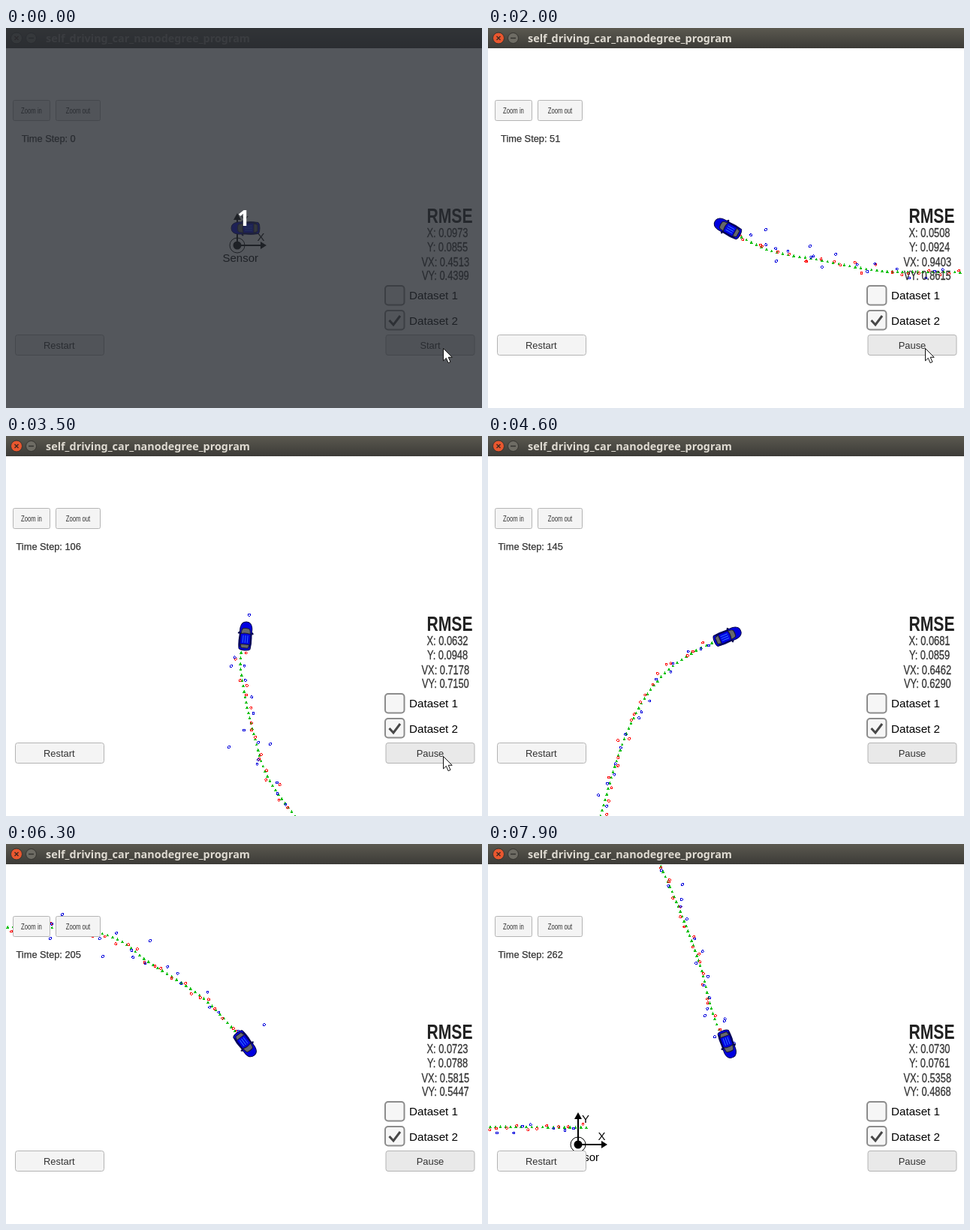
Animation of 634x507 px, one loop 8 s. Source, as an HTML page:

```html
<!DOCTYPE html>
<html lang="en">
<head>
<meta charset="utf-8">
<title>Tracking simulator</title>
<style>
html, body { margin: 0; width: 100%; height: 100%; overflow: hidden; background: #fff; }
svg { display: block; width: 634px; height: 507px; font-family: "Liberation Sans", Arial, sans-serif; }
.title { font: bold 14.4px "Noto Sans", "Open Sans", sans-serif; }
.btn { fill: #f4f4f4; stroke: #b4b4b4; }
.mid { text-anchor: middle; fill: #323232; }
.box { fill: #f6f6f6; stroke: #8c8c8c; stroke-width: 2; }
.dot { fill: none; stroke-width: 1; shape-rendering: crispEdges; }
</style>
</head>
<body>
<svg viewBox="0 0 634 507">
  <defs>
    <linearGradient id="bar" x2="0" y2="1">
      <stop offset="0" stop-color="#5b5950"/><stop offset="1" stop-color="#3c3b37"/>
    </linearGradient>
  </defs>
  <rect width="634" height="507" fill="#fff"/>

  <g id="world">
    <g font-size="15">
      <path d="M0 0H34M0 0V-36" stroke="#000" stroke-width="2"/>
      <path d="M39 0l-8 -5v10zM0 -43l-5 9h10z"/>
      <circle r="10" fill="none" stroke="#000"/>
      <circle r="5.5"/>
      <text x="5" y="-29">Y</text>
      <text x="26.5" y="-6">X</text>
      <text x="-19.5" y="21.5">Sensor</text>
    </g>
    <path id="green" fill="#00be00" shape-rendering="crispEdges"/>
    <path id="red" class="dot" stroke="#f00"/>
    <path id="blue" class="dot" stroke="#00d"/>
  </g>

  <g id="car">
    <path d="M-17 -7.5Q-8 -9 0 -8H10Q19 -7 19 0Q19 7 10 8H0Q-8 9 -17 7.5Q-19 6 -19 0Q-19 -6 -17 -7.5Z" fill="#0000e0" stroke="#00004a"/>
    <path d="M3 -10l2 2M3 10l2 -2" stroke="#00004a" stroke-width="2"/>
    <path d="M-15 -7H4M-15 7H4" stroke="#000046" stroke-width="1.4"/>
    <path d="M3 -6Q9 -6 10 -4Q11 0 10 4Q9 6 3 6Q5 0 3 -6Z" fill="#66686c" stroke="#1a1a30"/>
    <path d="M-16 -4.5L-11 -6V6L-16 4.5Z" fill="#66686c" stroke="#1a1a30"/>
    <path d="M-9 -3H1M-9 0H1M-9 3H1" stroke="#2a62ff" stroke-width="1.2"/>
  </g>

  <g id="ui">
    <rect class="btn" x="9.5" y="96.5" width="49" height="27" rx="2"/>
    <rect class="btn" x="66.5" y="96.5" width="59" height="27" rx="2"/>
    <g class="mid" font-size="11">
      <text transform="translate(34 114) scale(.7 1)">Zoom in</text>
      <text transform="translate(96 114) scale(.7 1)">Zoom out</text>
    </g>
    <text id="step" class="mid" x="56.7" y="152" font-size="12.8" stroke="#323232" stroke-width=".25"></text>

    <g class="mid" font-size="17">
      <text transform="translate(591 260) scale(.755 1)" font-size="28" font-weight="bold" style="fill:#222">RMSE</text>
      <g id="rmse" stroke="#323232" stroke-width=".3">
        <text transform="translate(588 278.5) scale(.755 1)"></text>
        <text transform="translate(588 298) scale(.755 1)"></text>
        <text transform="translate(585.3 318) scale(.755 1)"></text>
        <text transform="translate(585.3 336) scale(.755 1)"></text>
      </g>
    </g>

    <rect class="box" x="505" y="344" width="25.5" height="25.5" rx="4"/>
    <rect class="box" x="505" y="377" width="25.5" height="25.5" rx="4"/>
    <path d="M510.5 390l5.5 6l9 -12" fill="none" stroke="#484848" stroke-width="3"/>
    <g font-size="15.2">
      <text x="537" y="362">Dataset 1</text>
      <text x="537" y="395.5">Dataset 2</text>
    </g>

    <rect class="btn" x="12.5" y="409.5" width="118" height="27" rx="3"/>
    <rect class="btn" x="506" y="409.5" width="118" height="27" rx="3" style="fill:#e9e9e9"/>
    <g class="mid" font-size="12.9">
      <text x="70.8" y="428">Restart</text>
      <text id="run" x="565" y="428"></text>
    </g>
  </g>

  <g>
    <rect width="634" height="27" fill="url(#bar)"/>
    <circle id="close" cx="14" cy="13.5" r="7.5" stroke="#33322e"/>
    <path d="M11.5 11l5 5m0 -5l-5 5" stroke="#3c2a22" stroke-width="1.4"/>
    <circle cx="33.5" cy="13.5" r="7" fill="#6e6c64" stroke="#33322e"/>
    <path d="M30 13.5h7" stroke="#33322e" stroke-width="1.5"/>
    <text id="title" class="title" x="53" y="18.5">self_driving_car_nanodegree_program</text>
  </g>

  <g id="count">
    <rect width="634" height="507" fill="#272a31" fill-opacity=".79"/>
    <text x="316.5" y="264" text-anchor="middle" font-size="29" font-weight="bold" fill="#fff" style="font-family:'Noto Sans',sans-serif">1</text>
  </g>
  <path id="cursor" d="M582.5 427.5v16.5l3.8 -3.6l2.8 6.4l2.9 -1.3l-2.8 -6.2h5z" fill="#fff" stroke="#111"/>
</svg>

<script>
const LOOP = 8000, CX = 319, CY = 267;
const $ = id => document.getElementById(id);

// time (ms), simulation step, errors of X, Y, VX, VY
const log = [
  [600, 1, .065, .115, 2.9, 2.4],
  [1000, 13, .0776, .1068, 1.8379, 1.5724],
  [2000, 51, .0508, .0924, .9403, .8615],
  [3500, 106, .0632, .0948, .7178, .7150],
  [5600, 180, .0710, .0805, .6030, .5771],
  [7100, 233, .0735, .0773, .5617, .5148],
  [7900, 262, .0730, .0761, .5358, .4868]
];
const oldErrors = [.0973, .0855, .4513, .4399];
const errors = log.map(row => row.slice(1));

// step, x, y relative to the sensor
const path = [
  [0, 11, -23], [13, -83, -24], [22, -144, -25], [35, -239, -42], [41.7, -289, -51], [51, -350, -82],
  [71, -458, -192], [81, -498, -252], [88, -513, -302], [95.4, -525, -354], [102.7, -530, -408], [106, -524, -432],
  [135, -426, -622], [145, -359, -657], [162, -234, -670], [177, -127, -647], [180, -110, -633],
  [195, -19, -570], [203.5, 24, -523], [215.5, 71, -448], [233, 128, -331],
  [246.7, 162, -241], [259, 188, -154], [262, 199, -134]
];

// step, heading in degrees
const heading = [[0, 180], [13, 180], [51, 209], [106, 275], [180, 388], [233, 430], [262, 430]];

// stray radar readings as seen from the car at a given step
const strays = [
  [51, 370,269, 384,311, 429,291, 445,319],
  [106, 324,239, 300,307, 297,415, 352,411],
  [180, 333,248, 270,269, 216,213, 200,245, 132,245],
  [233, 330,251, 287,169, 267,120, 247,58, 216,119],
  [262, 315,236, 289,229, 293,177]
];

function segment(keys, n) {
  let i = 0;
  while (i < keys.length - 2 && n > keys[i + 1][0]) i++;
  return i;
}

function linear(keys, n, warp = v => v) {
  const i = segment(keys, n), a = keys[i], b = keys[i + 1];
  const u = Math.min(1, Math.max(0, (warp(n) - warp(a[0])) / (warp(b[0]) - warp(a[0]))));
  return a.slice(1).map((v, k) => v + (b[k + 1] - v) * u);
}

function tangent(keys, i, k) {
  const slope = j => (keys[j + 1][k] - keys[j][k]) / (keys[j + 1][0] - keys[j][0]);
  if (i === 0) return slope(0);
  if (i === keys.length - 1) return slope(i - 1);
  const h0 = keys[i][0] - keys[i - 1][0], h1 = keys[i + 1][0] - keys[i][0];
  return (slope(i - 1) * h1 + slope(i) * h0) / (h0 + h1);
}

function spline(keys, n) {
  const i = segment(keys, n), a = keys[i], b = keys[i + 1];
  const h = b[0] - a[0], u = (n - a[0]) / h, w = 1 - u;
  return a.slice(1).map((v, j) => {
    const k = j + 1;
    return w * w * (1 + 2 * u) * v + u * u * (3 - 2 * u) * b[k]
      + h * u * w * (w * tangent(keys, i, k) - u * tangent(keys, i + 1, k));
  });
}

// seeded, between -1 and 1
function noise(n, k) {
  const r = j => { const v = Math.sin(n * 12.9898 + j * 78.233) * 43758.5453; return v - Math.floor(v); };
  return r(k) + r(k + 5) - 1;
}

const track = Array.from({ length: 263 }, (_, n) => spline(path, n));
const marks = { green: [], red: [], blue: [] };
const ring = (x, y) => `M${(x - 1.5).toFixed(1)} ${y.toFixed(1)}a1.5 1.5 0 1 0 3 0a1.5 1.5 0 1 0 -3 0z`;
const wedge = (x, y) => `M${(x - 2).toFixed(1)} ${(y + 2).toFixed(1)}h4l-2 -4z`;
const scatter = (n, size) => ring(track[n][0] + size * noise(n, 1), track[n][1] + size * noise(n, 2));

function nearest(x, y) {
  const gaps = track.map(([px, py]) => Math.hypot(px - x, py - y));
  return gaps.indexOf(Math.min(...gaps));
}

track.forEach(([x, y], n) => {
  marks.green.push([n, wedge(x, y)]);
  if (n % 2) marks.red.push([n, scatter(n, n < 14 ? 5 : 9)]);
  else if (n % 8) marks.blue.push([n, scatter(n, n < 14 ? 6 : 13)]);
});
for (const [n, ...p] of strays)
  for (let i = 0; i < p.length; i += 2) {
    const x = p[i] - CX + track[n][0], y = p[i + 1] - CY + track[n][1];
    marks.blue.push([Math.min(n, nearest(x, y)), ring(x, y)]);
  }

const show = (id, on) => $(id).setAttribute('visibility', on ? 'visible' : 'hidden');
const names = ['X', 'Y', 'VX', 'VY'];
let last = -1;

function draw(t) {
  const running = t >= 600;
  const n = running ? Math.round(linear(log, t)[0]) : 0;
  const [x, y] = track[n];
  $('world').setAttribute('transform', `translate(${Math.round(CX - x)} ${Math.round(CY - y)})`);
  $('car').setAttribute('transform', `translate(${CX} ${CY}) rotate(${spline(heading, n)[0]})`);
  for (const id in marks)
    $(id).setAttribute('d', running ? marks[id].filter(m => m[0] <= n).map(m => m[1]).join('') : '');

  const values = running ? linear(errors, n, v => 1 / Math.sqrt(v)) : oldErrors;
  [...$('rmse').children].forEach((el, i) => { el.textContent = `${names[i]}: ${values[i].toFixed(4)}`; });
  $('step').textContent = `Time Step: ${n}`;
  $('run').textContent = running ? 'Pause' : 'Start';
  $('title').setAttribute('fill', running ? '#dfdbd2' : '#85827c');
  $('close').setAttribute('fill', running ? '#e9572f' : '#6e6c64');
  show('count', t < 200);
  show('cursor', t < 4500);
}

function tick() {
  const t = Math.floor(performance.now() % LOOP / 100) * 100;
  if (t !== last) draw(last = t);
  requestAnimationFrame(tick);
}
tick();
</script>
</body>
</html>
```
